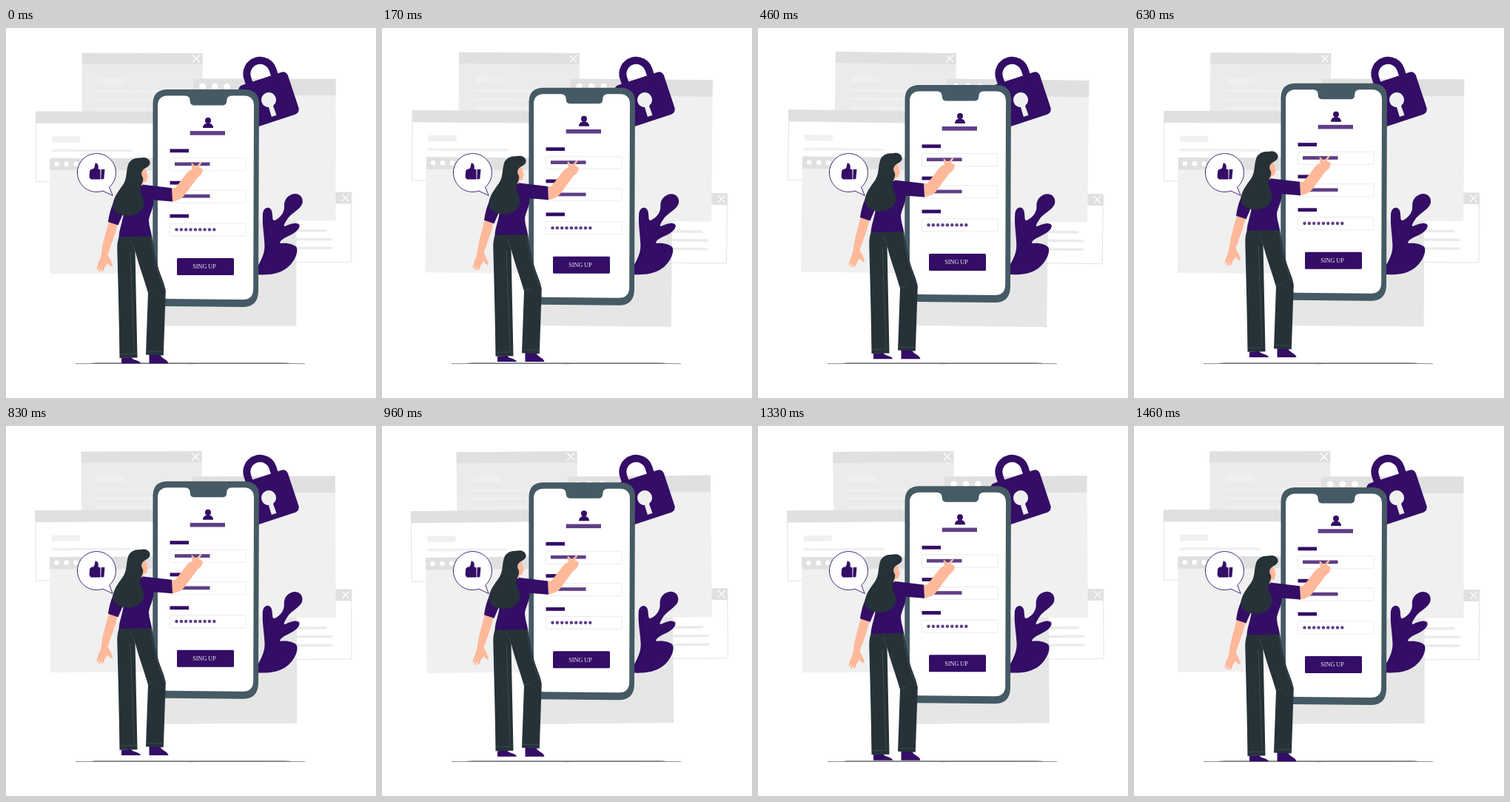
An HTML page for the animation above (1.5 s loop, 500 px wide and 500 px high).

```html
<!DOCTYPE html>
<html lang="en">
<head>
<meta charset="utf-8">
<title>Sign up</title>
<style>
  html, body { margin: 0; width: 100%; height: 100%; overflow: hidden; background: #fff; }
  svg { display: block; width: 100%; height: 100%; }
  .ink { fill: #330d66; }
  .soft { fill: #5f3f87; }
  .skin { fill: #ffb99a; }
  .dark { fill: #263238; }
  .head { fill: #e0e0e0; }
  .pale { fill: #f0f0f0; }
  .box { fill: #fff; stroke: #e6e6e6; stroke-width: .8; }
  .seam { fill: none; stroke: #50606a; stroke-width: .5; }
  .cross { fill: none; stroke: #fff; stroke-width: 1.2; }
</style>
</head>
<body>
<svg viewBox="0 0 500 500" xmlns="http://www.w3.org/2000/svg">
  <g id="windows">
    <rect x="102.5" y="34" width="163" height="150" fill="#ebebeb"/>
    <rect class="head" x="102.5" y="34" width="163" height="15"/>
    <path class="cross" d="M252 36.5l10 10m0-10l-10 10"/>
    <g class="pale">
      <rect x="124" y="67" width="38" height="8"/>
      <rect x="124" y="84" width="110" height="3.4"/>
      <rect x="124" y="95.5" width="110" height="3.4"/>
      <rect x="124" y="107.5" width="110" height="3.4"/>
    </g>

    <rect x="40.3" y="113.5" width="163" height="94.5" fill="#fff" stroke="#e0e0e0" stroke-width=".9"/>
    <rect class="head" x="40" y="113" width="164" height="16"/>
    <rect class="pale" x="62" y="146.700" width="38" height="8"/>
    <rect class="pale" x="62" y="164" width="108" height="3.4"/>

    <rect class="pale" x="59.500" y="176" width="163" height="156"/>
    <rect class="head" x="59.500" y="176" width="163" height="16.500"/>
    <g fill="#fff">
      <circle cx="68.800" cy="184" r="3.300"/>
      <circle cx="81.700" cy="184" r="3.300"/>
      <circle cx="94.600" cy="184" r="3.300"/>
    </g>

    <rect x="303" y="222" width="163.500" height="94" fill="#fff" stroke="#e0e0e0" stroke-width=".9"/>
    <rect class="head" x="303" y="221.700" width="164" height="15.500"/>
    <path class="cross" d="M454 224.500l9.500 9.500m0-9.500l-9.500 9.500"/>
    <g fill="#ebebeb">
      <rect x="340" y="272" width="93.500" height="3.400"/>
      <rect x="340" y="283.700" width="101" height="3.400"/>
      <rect x="340" y="295.500" width="101" height="3.400"/>
    </g>

    <rect x="200" y="246" width="192.500" height="156.500" fill="#e6e6e6"/>
    <rect class="pale" x="253" y="68.500" width="192.500" height="191.500"/>
    <rect class="head" x="253" y="68.500" width="192.500" height="22.500"/>
    <g fill="#fff">
      <circle cx="265.500" cy="79" r="4.400"/>
      <circle cx="282" cy="79" r="4.400"/>
      <circle cx="298.500" cy="79" r="4.400"/>
    </g>
  </g>

  <g transform="translate(355 97) rotate(-18.300)">
    <path d="M-18-27V-37A18 18 0 0 1 18-37V-27" fill="none" stroke="#330d66" stroke-width="10"/>
    <rect class="ink" x="-35" y="-30" width="70" height="60" rx="7"/>
    <path class="pale" d="M-3 6L-3.500 23H3.500L3 6z"/>
    <circle class="pale" r="10"/>
  </g>

  <g id="leaf">
    <path class="ink" d="M334 333C341 320 350 308 349.500 294C349 279 346 266 347 251C348 242 356 240 359 247C361 253 359 261 363 260C370 257 376 250 376 242C375 231 382 225 390 224C398 224 402 230 400.500 237C398 245 386 250 381 257C377 263 374 268 377 268C383 265 393 261 396.500 266C398 272 389 278 382 281C375 284 368 289 371 291C377 290 388 291 392.500 296C396 303 389 317 380 324C367 334 352 334 334 333z"/>
    <path d="M338 329C352 306 365 277 390 238M350 308L354 254M358 293L386 271M349 314L384 301" fill="none" stroke="#2a0956" stroke-width=".6"/>
  </g>

  <g fill="#737d78">
    <rect x="94" y="453" width="310" height=".8"/>
    <path d="M113 453.600C117 452.300 121 452.300 126 452.300H373C379 452.300 383 452.500 387 453.600C380 454.300 120 454.300 113 453.600z"/>
  </g>

  <g id="phone">
    <path d="M217 83H323Q342 84 342 102L341 356Q340.500 377 320 377L215 376Q198 375 198.200 356L198.500 102Q199 83.500 217 83z" fill="#455a64"/>
    <path d="M218 91.500H242Q248.500 91.500 248.700 98Q248.700 104.500 254 104.500H293Q298.300 104.500 298.300 98Q298.500 91.500 305 91.500H322Q335 92 335 105L334.200 353Q334 367 320 367L219 366Q205 365.500 205 352V105Q205 92 218 91.500z" fill="#fff"/>
    <circle class="ink" cx="273" cy="125" r="4"/>
    <path class="ink" d="M266 135C266 131 269 128.500 273 128.500S280 131 280 135z"/>
    <rect class="soft" x="248.700" y="139.200" width="47.300" height="5.600"/>
    <g id="fields"></g>
    <rect class="ink" x="231" y="311" width="77" height="23" rx="1.500"/>
    <text x="268" y="325.200" text-anchor="middle" font-size="8.200" fill="#f0ecf5" font-family="'Liberation Serif', serif">SING UP</text>
  </g>

  <path d="M139.700 215A26 26 0 1 0 131 220.100L144.200 226.500z" fill="#fff" stroke="#330d66" stroke-width=".9"/>
  <path class="ink" d="M120.500 182.500C124 182 125.500 186 124.500 190.500L127.500 191.200V204.500H116C113.500 204.500 112.500 202 112.700 199L113.200 193.500C113.400 191.500 115 190.800 118 190.300C120 189 120 186 120.500 182.500zM128.700 191L133.500 191L132.300 204.300H128.300z"/>

  <g id="woman">
    <path class="skin" d="M139 261C135 277 130 292 129 304C128 312 123 320 122.500 326C123 328 125 326 126.500 322L125 329C126 331 127.500 329 129.500 324L129 329.500C131 330 132 328 133.500 323L137.500 317.500C139 320 142 323 144 322C144.500 319 140 311 137.500 306C142 293 147 281 150.500 266z"/>
    <path class="skin" d="M222 216.500L229 216L242.500 198.500C245 194.500 248 192.500 252 190.500L250.500 184Q251.500 181.500 253 184L256.500 188L262.500 181Q265 180 264 183L260.500 188L265.500 190.500Q266.500 194 263 199L258.500 202.500L240 227.500Q235 233 223 235z"/>
    <path class="ink" d="M156 446L169 445C171 449 181 449 182 453.300H156zM193.500 441L208 441C211 448 218 447 219.500 453.300H193.500z"/>
    <path class="dark" d="M153 281L197 280.500C199 293 202 309 205 321C208 334 214 343 215.800 355L212.800 442.500L189 441.500L192 358C186 337 179 319 174.500 301L177.500 445.500L153.500 446C153 400 151.500 345 150.300 299Q150 289 153 281z"/>
    <path class="seam" d="M196 283C200 312 205 332 214 352M192 357Q194 356 200 354.500M154 440.500L177 440M189.500 437L213 437.500M174.500 301Q172 292 168 287M168 302L173 438"/>
    <path class="ink" d="M184 211.500L224 216.200L225 234.500L199.500 232.500C200 242 194 252 193 259C193 267 196 274 197 281.300L152.500 282.300C153 271 158 262 159 249L151.500 266.500L138 262C140 248 144 235 152 225C162 213 173 211 184 211.500z"/>
    <path class="skin" d="M181 188L188 188C190 194 191 198 192 202L190.500 203C190.800 207 189.500 208.500 186 208L184 213L178 212L179 196z"/>
    <path class="dark" d="M194.500 181C193 175.500 187 174 181 175.500C175 175 167 178 165 185C162 194 164 203 158 212C154 218 147 226 145 235C142 245 149 252 161 253.500C174 255 187 248 186.500 236C186 228 180 222 182 215C183 210 187 206 184.500 201C182 197 183 193 187 190C191 188.500 195.500 185 194.500 181z"/>
  </g>
</svg>
<script>
const $ = id => document.getElementById(id);
const LOOP = 1500, STEP = LOOP / 36;

// Three form rows: label, box, then a text bar or password dots
$('fields').innerHTML = [163.500, 206.800, 251.700].map((y, row) => {
  let value = `<rect class="soft" x="228" y="${y + 18}" width="47.500" height="4.700"/>`;
  if (row === 2) {
    value = '';
    for (let i = 0; i < 9; i++) value += `<circle class="soft" cx="${230.500 + i * 6.350}" cy="${y + 20.700}" r="2.200"/>`;
  }
  return `<rect class="ink" x="221.500" y="${y}" width="25.500" height="4.800"/>
    <rect class="box" x="221.500" y="${y + 12.300}" width="102.500" height="17" rx="1.500"/>${value}`;
}).join('');

function draw(ms) {
  // 24 steps per second, each posed at its middle
  const t = ms % LOOP;
  const p = (Math.floor((t + 4) / STEP) % 36 + .5) / 36;
  const lift = .27 - 10 * (1 - Math.abs(1 - 2 * p));
  const sway = p < .25 ? 4 * p : p < .75 ? 2 - 4 * p : 4 * p - 4;
  for (const id of ['phone', 'woman']) $(id).setAttribute('transform', `translate(0 ${lift})`);
  $('windows').setAttribute('transform', `rotate(${sway} 253 218)`);
  $('leaf').setAttribute('transform', `rotate(${sway} 368 278)`);
}

const start = performance.now();
function tick() {
  draw(performance.now() - start);
  requestAnimationFrame(tick);
}
tick();
</script>
</body>
</html>
```
